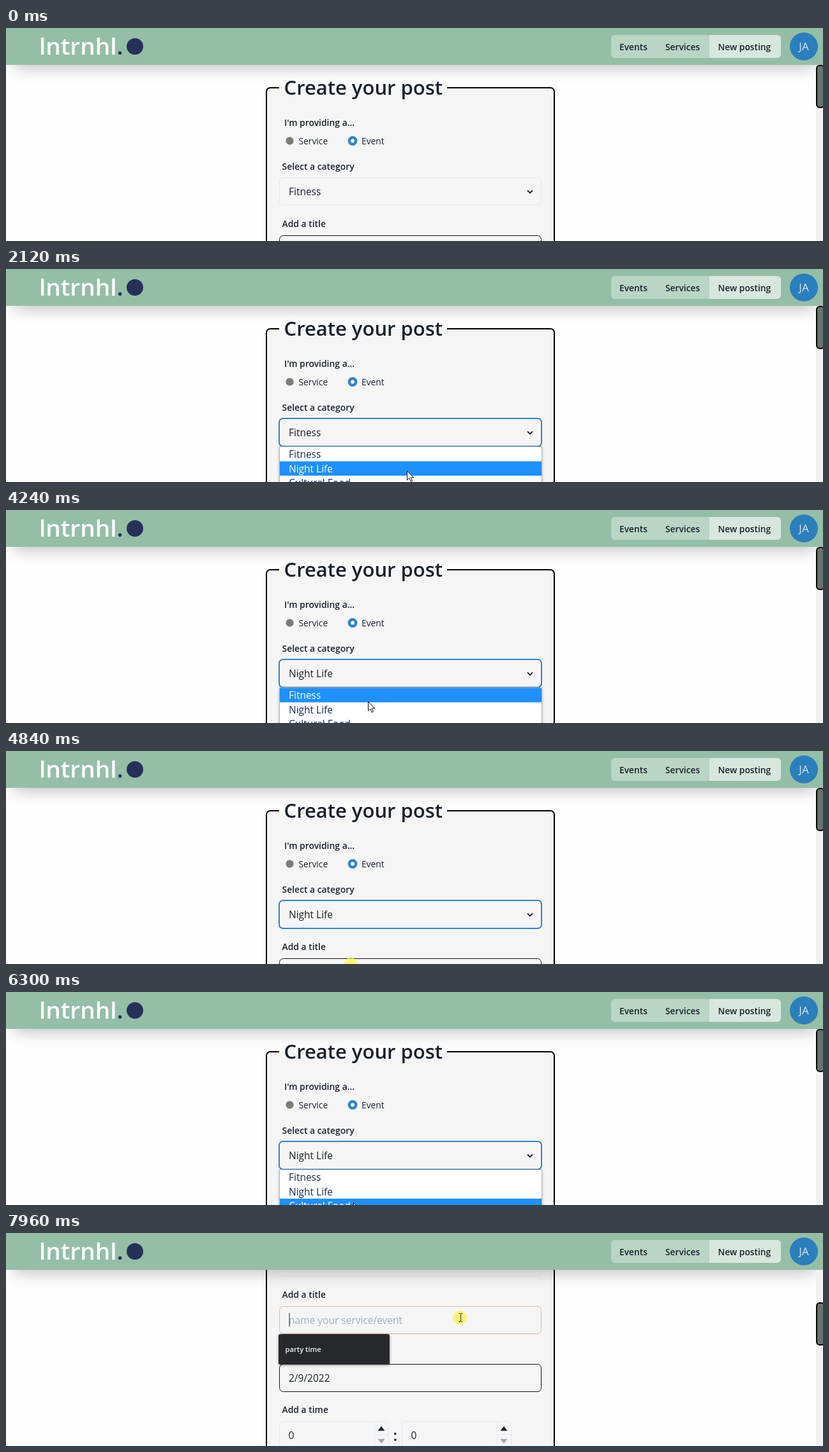
Recreate the animation shown at these times as an HTML page. Size 1280x335 px, loop 8 s.

```html
<!DOCTYPE html>
<html lang="en">
<head>
<meta charset="utf-8">
<title>Create your post</title>
<style>
  html, body { margin: 0; width: 100%; height: 100%; overflow: hidden; background: #fefefe; }
  svg { display: block; width: 1280px; height: 335px; }
  text { font: 15.5px 'Open Sans', 'Noto Sans', sans-serif; fill: #1a202c; white-space: pre; }
  .label { font-size: 13.9px; font-weight: 600; }
  .nav { font-size: 13.8px; font-weight: 600; }
  .small { font-size: 13.8px; }
  .box { fill: none; stroke: #111; }
  .soft { fill: none; stroke: #e2e8f0; }
</style>
</head>
<body>
<svg viewBox="0 0 1280 335">
  <defs>
    <g id="stepper">
      <rect class="soft" x=".5" y=".5" width="171" height="43" rx="6"/>
      <path class="soft" d="M149.5 0V44M149.5 21.5H172"/>
      <path d="M154.500 15l5.500-7 5.500 7z" fill="#1a202c"/>
      <path d="M154.500 28l5.500 7 5.500-7z" fill="#a3a3b2"/>
      <text x="14.500" y="28">0</text>
    </g>
  </defs>

  <g id="page">
    <rect x="407" y="93" width="453" height="800" rx="7" fill="#f5f5f5"/>
    <path d="M428 94H414a6 6 0 0 0-6 6V900H859V100a6 6 0 0 0-6-6H691" fill="none" stroke="#000" stroke-width="2"/>
    <rect x="428" y="76" width="263" height="18" fill="#fefefe"/>
    <text x="435.500" y="105" style="font-size:31px;font-weight:600">Create your post</text>

    <text class="label" x="436" y="154">I'm providing a...</text>
    <circle cx="444.500" cy="177.500" r="6.500" fill="#7b7c77" stroke="#e2e8f0"/>
    <text class="small" x="458.500" y="183">Service</text>
    <circle cx="543" cy="177.500" r="5.200" fill="#fff" stroke="#3182ce" stroke-width="4.500"/>
    <text class="small" x="557" y="183">Event</text>

    <text class="label" x="432.500" y="223">Select a category</text>
    <rect class="soft" x="428.500" y="235.500" width="410" height="43" rx="6"/>
    <rect id="ring" x="428" y="235" width="411" height="44" rx="6" fill="none" stroke="#3182ce" stroke-width="2"/>
    <text id="value" x="443" y="263"></text>
    <path d="M817 255.500l4 4 4-4" fill="none" stroke="#1a202c" stroke-width="1.800"/>

    <text class="label" x="432.500" y="313">Add a title</text>
    <rect id="title" class="box" x="428.500" y="326.500" width="410" height="43" rx="6"/>
    <text x="443" y="354" style="fill:#9db0bd">name your service/event</text>

    <text class="label" x="432.500" y="404">Add a date</text>
    <rect class="box" x="428.500" y="417.500" width="410" height="43" rx="6"/>
    <text x="443" y="444.500">2/9/2022</text>

    <text class="label" x="432.500" y="494">Add a time</text>
    <use href="#stepper" x="428" y="507"/>
    <text x="606.500" y="538" style="font-size:24px;font-weight:600">:</text>
    <use href="#stepper" x="620" y="507"/>

    <g id="suggest">
      <path d="M444 337V358" stroke="#222"/>
      <rect x="427" y="370" width="174" height="48" rx="3" fill="#27282c" style="filter:drop-shadow(0 1px 2px #0006)"/>
      <text x="437.500" y="398" style="font-size:11.200px;font-weight:600;fill:#f4f4f4">party time</text>
    </g>
  </g>

  <g id="popup">
    <rect x="428.500" y="279.500" width="411" height="120" fill="#fff" stroke="#b4b4b4" style="filter:drop-shadow(0 2px 2px #0004)"/>
    <rect id="mark" x="429" width="410" height="22.500" fill="#1e90ff"/>
  </g>

  <rect x="12" y="25" width="1256" height="38" style="filter:blur(13px)" fill="#000" opacity=".24"/>
  <rect x="1269" y="57" width="11" height="278" fill="#f1f1f1"/>
  <rect id="thumb" x="1270" y="59" width="12" height="66" rx="5" fill="#65756a" stroke="#000" stroke-width="2"/>

  <rect width="1280" height="58" fill="#94bfa6"/>
  <text x="52" y="42" style="font-size:37px;font-weight:600;fill:#fff">lntrnhl<tspan fill="#263159">.</tspan></text>
  <circle cx="202" cy="29" r="13" fill="#263159"/>
  <rect x="948" y="11" width="266" height="36" rx="6" fill="#b9d5c4"/>
  <path d="M1102 11h106a6 6 0 0 1 6 6v24a6 6 0 0 1-6 6h-106z" fill="#d8e7dd"/>
  <text class="nav" x="961" y="34.500">Events</text>
  <text class="nav" x="1033" y="34.500">Services</text>
  <text class="nav" x="1115.500" y="34.500">New posting</text>
  <circle cx="1250" cy="29" r="22" fill="#2a7fbc"/>
  <text x="1250" y="35" text-anchor="middle" style="font-size:17px;fill:#d9e8f2">JA</text>

  <g id="cursor">
    <circle id="halo" r="11" fill="#fff53c" opacity=".65"/>
    <path id="arrow" d="M.5 .5V15L3.900 11.800 6.200 17.300 8.500 16.300 6.200 11H10.800z" fill="#fff" stroke="#111"/>
    <path id="beam" d="M-1.500-6.500H1M2-6.500H4.500M1.500-6V6M-1.500 6.500H1M2 6.500H4.500" fill="none" stroke="#333"/>
  </g>
</svg>
<script>
const $ = id => document.getElementById(id);
const LOOP = 8000, SCROLL = 211, ROW = 22.5, POPUP_TOP = 280;
const items = ['Fitness', 'Night Life', 'Cultural Food'];

// pointer path: time, x, y
const path = [
  [790, 1200, 310], [1500, 640, 238], [1650, 640, 238], [2120, 628, 317],
  [2250, 615, 322], [2450, 615, 322], [2750, 600, 286], [3250, 579, 324],
  [3780, 579, 324], [3980, 600, 258], [4060, 600, 258], [4400, 540, 336],
  [4900, 540, 336], [5200, 955, 300], [5540, 610, 238], [5700, 610, 238],
  [5900, 560, 316], [6230, 560, 316], [6300, 544, 331], [6450, 544, 331],
  [7050, 984, 272], [7170, 984, 272], [7235, 944, 255], [7300, 888, 245],
  [7600, 860, 235], [7880, 711, 133]
];
const clicks = [[1520, 1640], [3320, 3390], [3980, 4050], [4840, 4960], [5560, 5680], [6370, 6440], [7900, LOOP]];
const openTimes = [[1560, 3390], [4010, 4380], [5580, 6440]];

const clamp = v => Math.min(1, Math.max(0, v));
const smooth = v => v * v * (3 - 2 * v);
const ramp = (t, a, b) => smooth(clamp((t - a) / (b - a)));
const within = (t, spans) => spans.some(([a, b]) => t >= a && t < b);
const show = (id, on) => $(id).style.display = on ? '' : 'none';

const options = items.map((name, i) => {
  const el = document.createElementNS('http://www.w3.org/2000/svg', 'text');
  el.textContent = name;
  el.setAttribute('x', 443);
  el.setAttribute('y', POPUP_TOP + 17 + i * ROW);
  return $('popup').appendChild(el);
});

function pointer(t) {
  const i = path.findIndex(p => p[0] > t);
  if (i < 0) return path[path.length - 1].slice(1);
  if (i === 0) return path[0].slice(1);
  const [t0, x0, y0] = path[i - 1], [t1, x1, y1] = path[i];
  const k = ramp(t, t0, t1);
  return [x0 + (x1 - x0) * k, y0 + (y1 - y0) * k];
}

function draw(t) {
  const [x, y] = pointer(t);
  const open = within(t, openTimes);
  const selected = t < 3390 ? 0 : t < 6440 ? 1 : 2;
  const scroll = Math.round(SCROLL * ramp(t, 7170, 7850));

  $('page').setAttribute('transform', `translate(0 ${-scroll})`);
  $('thumb').setAttribute('y', 59 + Math.round(scroll * 0.242));
  $('value').textContent = items[selected];
  $('ring').setAttribute('opacity', ramp(t, 1540, 1700) - ramp(t, 6900, 7080));

  show('popup', open);
  const hover = y < POPUP_TOP ? selected : Math.floor((y - POPUP_TOP) / ROW);
  $('mark').setAttribute('y', POPUP_TOP + hover * ROW);
  options.forEach((el, i) => el.style.fill = i === hover ? '#fff' : '#1a2a52');

  const focused = t >= 7900;
  $('title').style.stroke = focused ? '#dfb9a6' : '#111';
  show('suggest', t >= 7930);

  const top = 326 - scroll;
  const overInput = scroll > 0 && x > 428 && x < 839 && y > top && y < top + 43;
  show('cursor', t >= path[0][0]);
  $('cursor').setAttribute('transform', `translate(${Math.round(x)} ${Math.round(y)})`);
  show('halo', within(t, clicks));
  show('arrow', !overInput);
  show('beam', overInput);
}

function tick() {
  draw(performance.now() % LOOP);
  requestAnimationFrame(tick);
}
tick();
</script>
</body>
</html>
```
